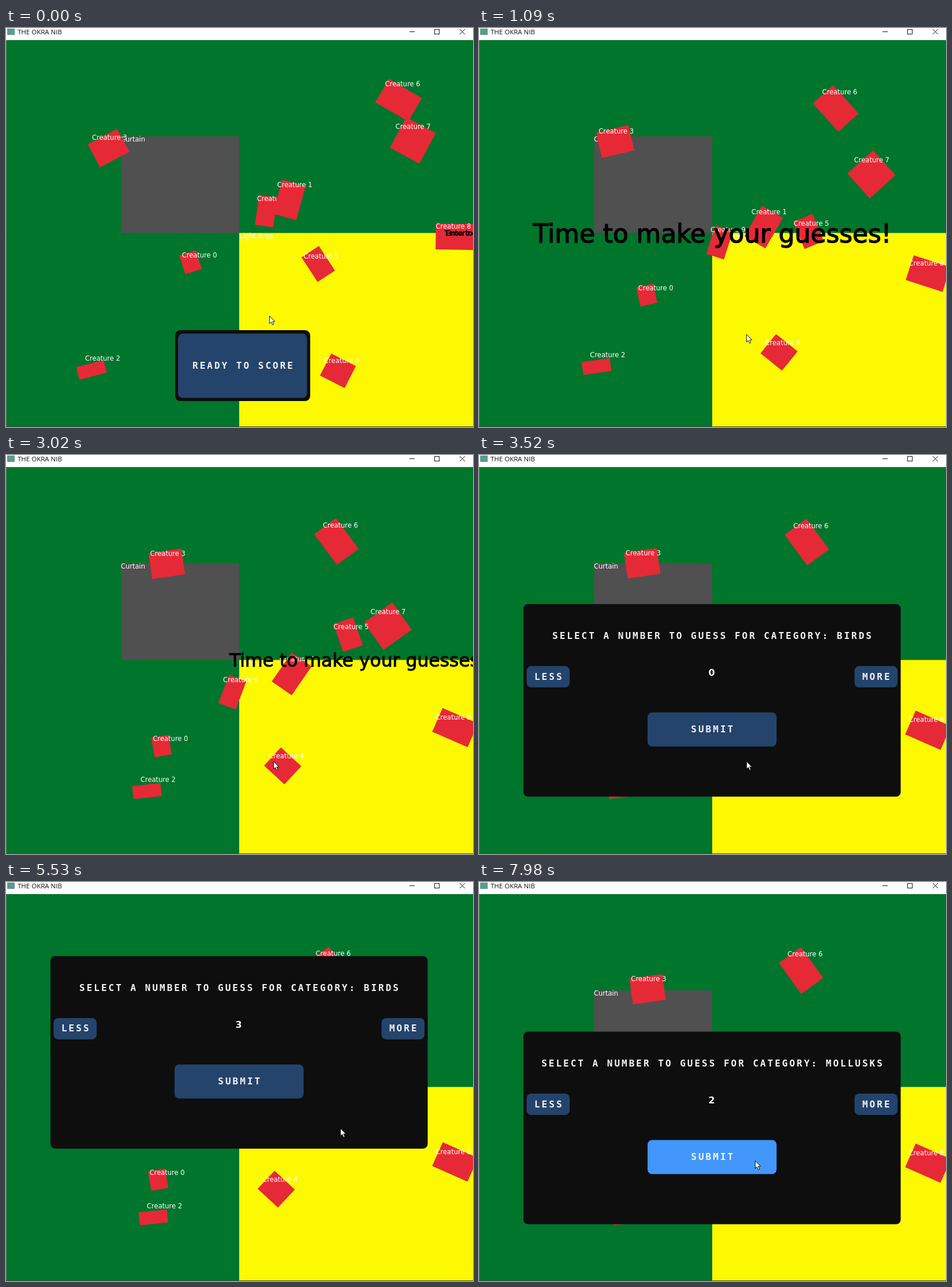
An HTML page with a canvas that plays this animation: 809 by 692 pixels, repeating every 8000 ms.

```html
<!DOCTYPE html>
<html lang="en">
<head>
<meta charset="utf-8">
<title>Creature game</title>
<style>
html, body { margin: 0; width: 100%; height: 100%; overflow: hidden; background: #fff; }
canvas { display: block; }
</style>
</head>
<body>
<canvas id="stage" width="809" height="692"></canvas>
<script>
const ctx = document.getElementById('stage').getContext('2d');
const LOOP = 8000;
const PANEL = '#0e0e0e', BLUE = '#24446c', HOVER = '#4397fa', INK = '#f2f5f8';
const UI_FONT = 'bold 16px "DejaVu Sans Mono", monospace';

const clamp = v => Math.max(0, Math.min(1, v));
const mix = (a, b, k) => a + (b - a) * k;
const smooth = k => k * k * (3 - 2 * k);
const radians = degrees => degrees * Math.PI / 180;

function elasticIn(x) {
  if (x <= 0) return 0;
  if (x >= 1) return 1;
  return -(2 ** (10 * x - 10)) * Math.sin((10 * x - 10.75) * 2 * Math.PI / 3);
}

// Share of the glide still to go: steady speed, then friction.
function remaining(t) {
  const tau = 1380, hold = 640, at = 1 / (1 + hold / tau);
  return t < hold ? 1 - at * t / tau : at * Math.exp(-(t - hold) / tau);
}

function box(x, y, w, h, color, radius = 0) {
  ctx.fillStyle = color;
  ctx.beginPath();
  ctx.roundRect(x, y, w, h, radius);
  ctx.fill();
}

function label(text, x, y) {
  ctx.font = '11.5px "DejaVu Sans", sans-serif';
  ctx.fillStyle = '#fff';
  ctx.fillText(text, x, y + 4);
}

function uiText(text, x, y) {
  ctx.font = UI_FONT;
  ctx.fillStyle = INK;
  ctx.letterSpacing = '3px';
  ctx.textAlign = 'center';
  ctx.fillText(text, x + 1.5, y + 6);
  ctx.textAlign = 'left';
  ctx.letterSpacing = '0px';
}

// All glide equally far to rest at x, y unless a bump shortened their reach.
function creature(x, y, heading, angle, w, h, reach = 126) {
  const dx = Math.cos(radians(heading)) * reach;
  const dy = Math.sin(radians(heading)) * reach;
  const spin = w * h / 130; // bigger boxes turn further
  return (name, t) => {
    const far = remaining(t);
    ctx.save();
    ctx.translate(x - dx * far, y - dy * far);
    ctx.save();
    ctx.rotate(radians(angle - spin * far ** 1.9));
    box(-w / 2, -h / 2, w, h, '#e62937');
    ctx.restore();
    label(name, -w / 2, 4.5 - h / 2);
    ctx.restore();
  };
}

const creatures = [
  creature(262.5, 518.5, 117, -10, 30, 34),
  creature(495.5, 391, 87, 35, 42, 61, 93),
  creature(257.5, 581.5, -6, 84, 22.5, 49, 110),
  creature(292.5, 186, -11, -8, 57.5, 45, 117),
  creature(466, 531.5, 210, 43, 48, 43),
  creature(600, 298, -62, 71, 51, 36),
  creature(557.5, 153.5, 167, -36, 47, 66),
  creature(655.5, 311, 113, -35, 60, 58),
  creature(778, 488, 90, 24, 67, 45),
  creature(384, 424.5, 122, 21, 32, 52)
];

function drawField() {
  box(0, 0, 809, 692, '#00752c');
  box(199.5, 188, 204.5, 167.5, '#505050');
  label('Curtain', 199, 193);
  box(404, 355.5, 405, 336.5, '#fdf900');
  label('Light Area', 404, 361);
}

function drawCreatures(t) {
  for (let i = creatures.length - 1; i >= 0; i--) creatures[i]('Creature ' + i, t);
}

function bigText(text, x, size, align) {
  ctx.font = size + 'px "DejaVu Sans", sans-serif';
  ctx.fillStyle = ctx.strokeStyle = '#000';
  ctx.lineWidth = size / 32;
  ctx.textAlign = align;
  ctx.fillText(text, x, 355.5 + size * 0.37);
  ctx.strokeText(text, x, 355.5 + size * 0.37);
  ctx.textAlign = 'left';
}

function drawMessage(t) {
  if (t < 60) bigText('Entering', 761, 13, 'left');
  if (t > 3200) return;
  const enter = 1 - (1 - clamp(t / 830)) ** 3;
  const leave = clamp((t - 2600) / 600) ** 3;
  const settled = 41.2 + 3.7 * (1 - clamp((t - 830) / 1570)) ** 2;
  const size = mix(mix(13, settled, enter), 13, leave);
  const x = mix(mix(854, 404, enter), 1000, leave);
  bigText('Time to make your guesses!', x, size, 'center');
}

function drawReady(t) {
  const k = (t + 262) / 400;
  if (k >= 1) return;
  const y = 503 + 360 * elasticIn(k);
  box(293, y, 234, 123, PANEL, 9);
  box(298, y + 6, 223.5, 111.5, BLUE, 8);
  uiText('READY TO SCORE', 410, y + 61);
}

function button(text, x, y, w, h, [cx, cy]) {
  const over = cx > x && cx < x + w && cy > y && cy < y + h;
  box(x, y, w, h, over ? HOVER : BLUE, 8);
  uiText(text, x + w / 2, y + h / 2 - 1);
}

// The count rises by one every 230 ms from firstClick, up to the guess.
const panels = [
  { category: 'BIRDS', from: 3245, to: 5189, firstClick: 4130, guess: 3 },
  { category: 'MOLLUSKS', from: 5740, to: Infinity, firstClick: 7040, guess: 2 }
];

function drawPanel(t, cursor, { category, from, to, firstClick, guess }) {
  if (t < from || t >= to + 400) return;
  const shift = t < to ? elasticIn(1 - (t - from) / 400) : elasticIn((t - to) / 400);
  const count = Math.floor(guess * clamp((t - firstClick + 230) / (230 * guess)));
  const y = 259.5 + 360 * shift;
  box(77, y, 653.5, 334, PANEL, 8);
  uiText('SELECT A NUMBER TO GUESS FOR CATEGORY: ' + category, 403.5, y + 54.5);
  button('LESS', 82.5, y + 107.5, 74.5, 37, cursor);
  button('MORE', 650.5, y + 107.5, 74.5, 37, cursor);
  button('SUBMIT', 292, y + 188, 223.5, 59, cursor);
  ctx.font = 'bold 16px "DejaVu Sans", sans-serif';
  ctx.fillStyle = INK;
  ctx.fillText(count, 397.5, y + 124.5);
}

function line(points, color) {
  ctx.strokeStyle = color;
  ctx.lineWidth = 1;
  ctx.beginPath();
  points.forEach(([x, y], i) => i % 2 ? ctx.lineTo(x, y) : ctx.moveTo(x, y));
  ctx.stroke();
}

function drawWindow() {
  box(0, 0, 809, 21, '#fff');
  box(2, 1, 13, 11, '#5b9a8b');
  ctx.font = '11.5px "Open Sans", sans-serif';
  ctx.fillStyle = '#111';
  ctx.fillText('THE OKRA NIB', 20, 11);
  line([[699, 6.5], [708, 6.5]], '#111');
  ctx.strokeRect(742.5, 2.5, 8, 8);
  line([[786, 2], [795, 11], [795, 2], [786, 11]], '#111');
  line([[0.5, 21], [0.5, 692]], '#5c7a66');
  line([[0, 691.5], [809, 691.5]], '#3c4a3c');
}

// Each move eases from the last stop and takes 300 ms.
const moves = [
  { at: 200, to: [463, 531] },
  { at: 3630, to: [684, 382] },
  { at: 4700, to: [482, 474] },
  { at: 5190, to: [579, 427] },
  { at: 6650, to: [684, 382] },
  { at: 7400, to: [478, 483] }
];

function cursorAt(t) {
  return moves.reduce(([x, y], { at, to }) => {
    const k = smooth(clamp((t - at) / 300));
    return [mix(x, to[0], k), mix(y, to[1], k)];
  }, [456, 499]);
}

const arrow = new Path2D('M0 0V13L3 10.3L5.2 15.2L7.4 14.2L5.3 9.5H9.3Z');

function drawCursor([x, y]) {
  ctx.save();
  ctx.translate(x + 0.5, y + 0.5);
  ctx.fillStyle = '#fff';
  ctx.strokeStyle = '#111';
  ctx.lineWidth = 1;
  ctx.fill(arrow);
  ctx.stroke(arrow);
  ctx.restore();
}

function draw(t) {
  const cursor = cursorAt(t);
  drawField();
  drawCreatures(t);
  drawMessage(t);
  drawReady(t);
  panels.forEach(panel => drawPanel(t, cursor, panel));
  drawWindow();
  drawCursor(cursor);
}

const start = performance.now();
function tick() {
  draw((performance.now() - start) % LOOP);
  requestAnimationFrame(tick);
}
tick();
</script>
</body>
</html>
```
